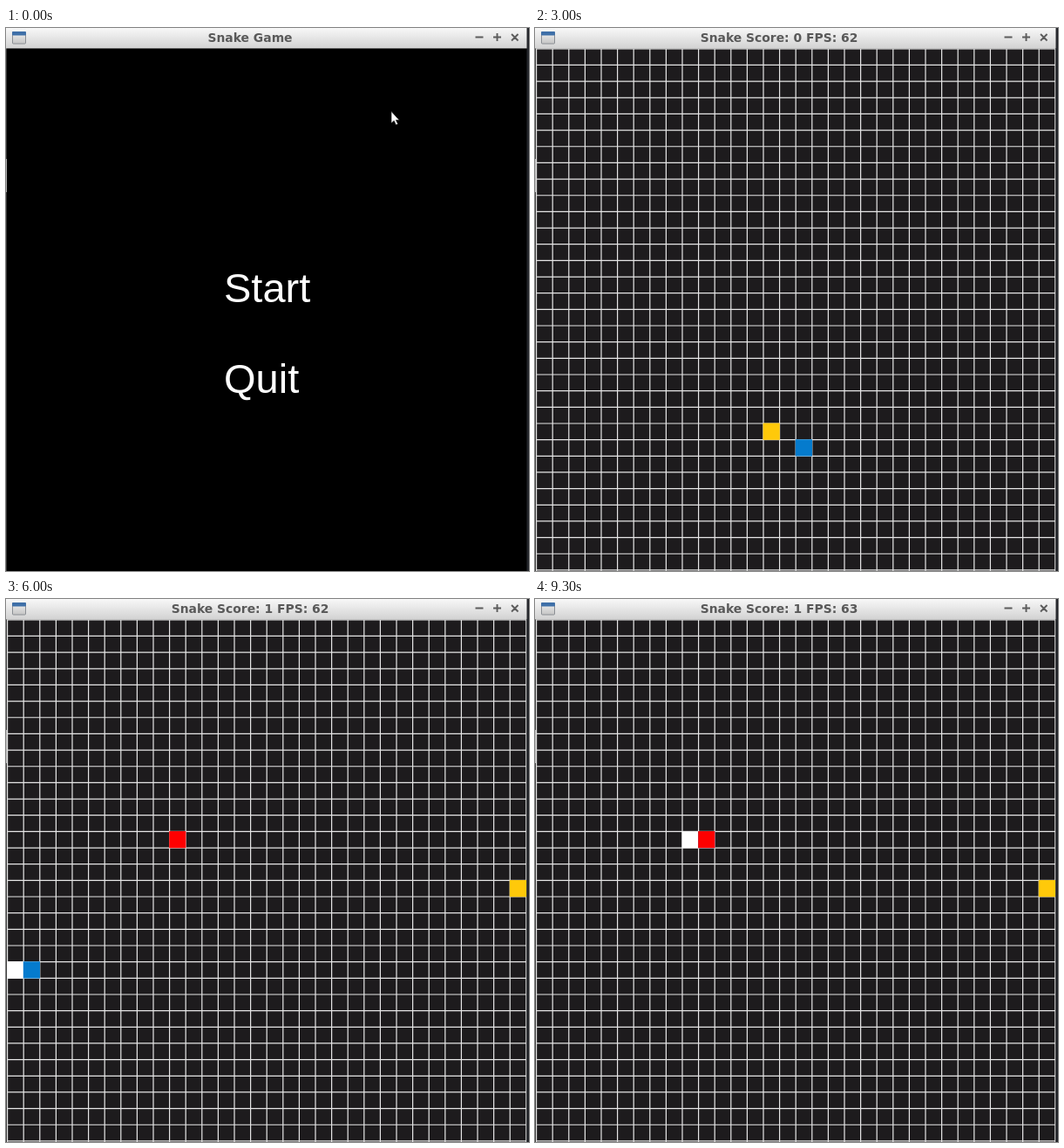
An HTML page for the animation above (10000 ms loop, 600 by 622 pixels).

```html
<!DOCTYPE html>
<html lang="en">
<head>
<meta charset="utf-8">
<title>Snake</title>
<style>
  html, body { margin: 0; width: 100%; height: 100%; overflow: hidden; background: #000; }
  svg { display: block; width: 100vw; height: 100vh; }
  #title { font: bold 13.9px "DejaVu Sans", sans-serif; fill: #595959; text-anchor: middle; }
  #menu text { font: 47px "Liberation Sans", Arial, sans-serif; fill: #fff; }
</style>
</head>
<body>
<svg viewBox="0 0 600 622">
  <defs>
    <linearGradient id="bar" x2="0" y2="1">
      <stop offset="0" stop-color="#f8f8f8"/>
      <stop offset="1" stop-color="#d2d2d2"/>
    </linearGradient>
    <linearGradient id="pane" x2="0" y2="1">
      <stop offset="0" stop-color="#f2f2f2"/>
      <stop offset="1" stop-color="#c4c4c4"/>
    </linearGradient>
  </defs>
  <rect width="600" height="622" fill="#000"/>

  <g id="menu">
    <text x="250" y="313.5">Start</text>
    <text x="250" y="417.5">Quit</text>
  </g>

  <g id="game">
    <rect x="1" y="23" width="596" height="599" fill="#1d1b1d"/>
    <path id="grid" fill="none" stroke="#e6e6e6" stroke-width="1.2"/>
    <rect id="tail" fill="#fff"/>
    <rect id="head" fill="#057bcd"/>
    <rect id="food" fill="#ffc90a"/>
    <rect id="trap" fill="#fe0000"/>
  </g>

  <rect x="597.4" width="2.6" height="622" fill="#25272c"/>
  <rect width="1" height="622" fill="#3a3a3a"/>
  <rect y="150" width="1" height="38" fill="#b0b0b0"/>
  <rect width="597.5" height="23.4" fill="url(#bar)"/>
  <g>
    <rect x="7.5" y="4.5" width="15" height="13.5" rx="1" fill="url(#pane)" stroke="#8b8f94"/>
    <rect x="7" y="4" width="16" height="4.5" rx="1" fill="#3f70a8"/>
  </g>
  <text id="title" x="280" y="16"></text>
  <path d="M538.5 10.5h9M559 10.5h9M563.5 6v9M580 7l7.5 7.5M587.5 7l-7.5 7.5"
        fill="none" stroke="#5c5c5c" stroke-width="1.9"/>
  <path id="cursor" d="M0 0V13.5L3.2 10.8 5.4 15.6 7.6 14.5 5.4 10H9.2Z"
        fill="#fff" stroke="#222" stroke-width=".7"/>
</svg>
<script>
const LOOP = 10000, TICK = 100;
const CELLS = 32, LEFT = 1.6, TOP = 23.8, CELL_W = 18.6, CELL_H = 18.66;
const GAME_AT = 800, MOVE_AT = 1200, MOVE_MS = 77.5, BITE = 26;

// Each leg: columns per move, rows per move, number of moves.
const legs = [[0, -1, 24], [-1, 0, 9], [0, -1, 2], [1, 0, 27], [0, -1, 8], [1, 0, 8]];
const wrap = n => (n + CELLS) % CELLS;
const path = [[16, 15]];
for (const [dx, dy, count] of legs) {
  for (let i = 0; i < count; i++) {
    const [x, y] = path[path.length - 1];
    path.push([wrap(x + dx), wrap(y + dy)]);
  }
}

const el = id => document.getElementById(id);
const [menu, game, title, cursor, head, tail, food, trap] =
  ["menu", "game", "title", "cursor", "head", "tail", "food", "trap"].map(el);

const show = (node, on) => node.setAttribute("visibility", on ? "inherit" : "hidden");

function place(node, [col, row]) {
  node.setAttribute("x", LEFT + col * CELL_W - 0.4);
  node.setAttribute("y", TOP + row * CELL_H - 0.4);
}

function drawGrid() {
  let d = "";
  for (let i = 0; i <= CELLS; i++) {
    d += `M${LEFT + i * CELL_W} ${TOP}V622M1 ${TOP + i * CELL_H}H597`;
  }
  el("grid").setAttribute("d", d);
  for (const node of [head, tail, food, trap]) {
    node.setAttribute("width", CELL_W + 0.6);
    node.setAttribute("height", CELL_H + 0.6);
  }
  place(trap, [10, 13]);
}

function fps(t) {
  if (t < 1100) return 1;
  return (t >= 4000 && t < 4700) || t >= 8300 ? 63 : 62;
}

function render(t) {
  const playing = t >= GAME_AT;
  show(menu, !playing);
  show(game, playing);

  const step = Math.min(path.length - 1, Math.max(0, Math.floor((t - MOVE_AT) / MOVE_MS)));
  const fed = step >= BITE;
  place(head, path[step]);
  place(tail, path[Math.max(0, step - 1)]);
  place(food, fed ? [31, 16] : [14, 23]);
  show(tail, fed);
  show(trap, fed);

  title.textContent = playing ? `Snake Score: ${fed ? 1 : 0} FPS: ${fps(t)}` : "Snake Game";

  const p = Math.min(1, t / 600);
  const ease = p * p * (3 - 2 * p);
  cursor.setAttribute("transform", `translate(${442 - 116 * ease} ${95.5 + 199 * ease})`);
  show(cursor, t < MOVE_AT);
}

function frame() {
  const t = performance.now() % LOOP;
  render(Math.floor(t / TICK) * TICK);
  requestAnimationFrame(frame);
}

drawGrid();
frame();
</script>
</body>
</html>
```
